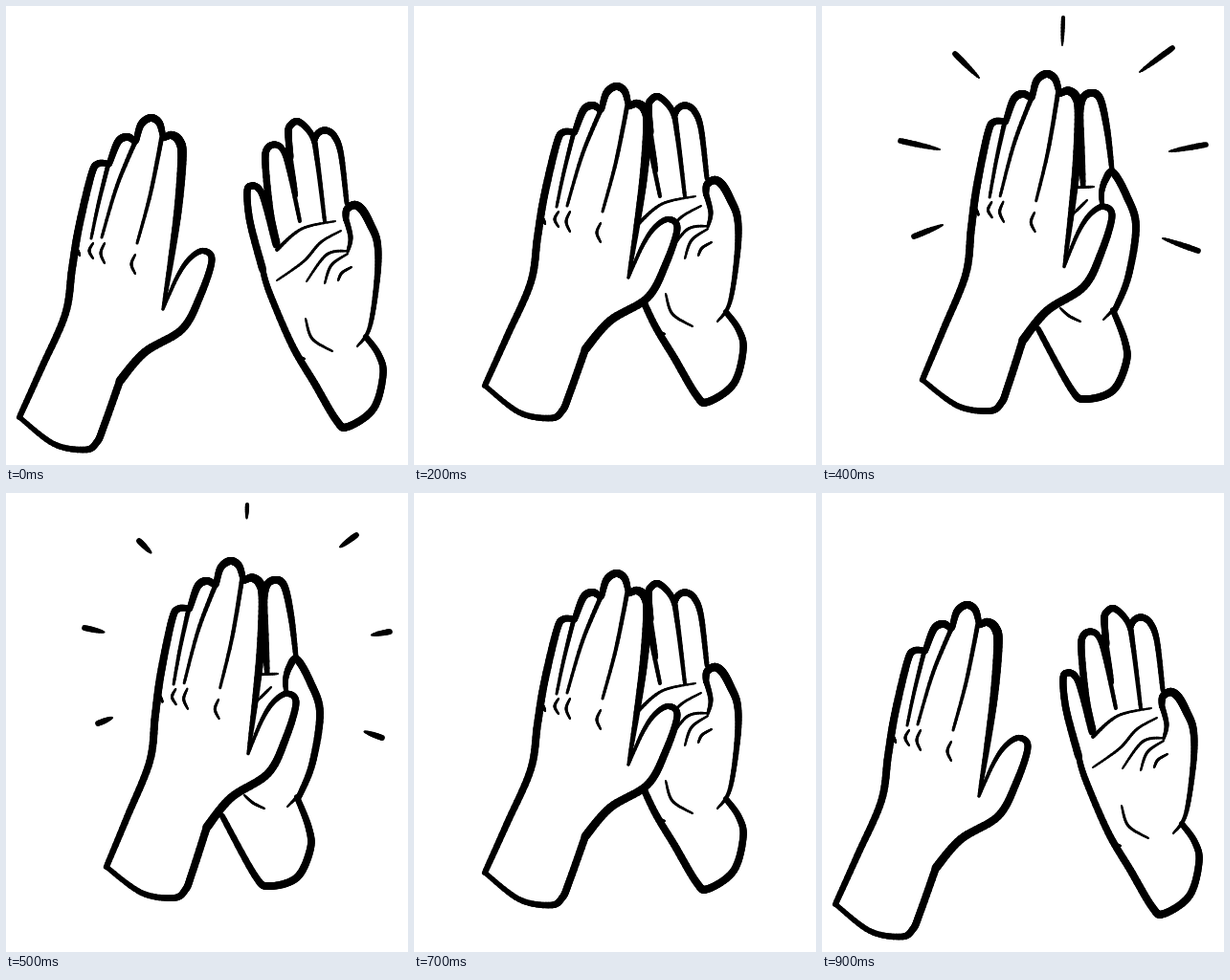
Animation, 420 px wide and 480 px high, one loop 1000 ms. Source, as an HTML page with a canvas:

```html
<!DOCTYPE html>
<html lang="en">
<head>
<meta charset="utf-8">
<title>Folding hands</title>
<style>
html, body { margin: 0; width: 100%; height: 100%; overflow: hidden; background: #fff; }
canvas { display: block; }
</style>
</head>
<body>
<canvas id="stage" width="420" height="480"></canvas>
<script>
const ctx = document.getElementById('stage').getContext('2d');

const spline = (a, b, c, d, t) =>
  b + t * (c - a + t * (2 * a - 5 * b + 4 * c - d + t * (3 * (b - c) + d - a))) / 2;

// Smooth curve through flat x, y pairs.
function smooth(xy) {
  const n = xy.length / 2, div = 10, out = [];
  const at = (i, k) => xy[2 * Math.max(0, Math.min(n - 1, i)) + k];
  for (let s = 0; s <= (n - 1) * div; s++) {
    const i = Math.min(n - 2, Math.floor(s / div)), t = s / div - i;
    out.push([0, 1].map(k => spline(at(i - 1, k), at(i, k), at(i + 1, k), at(i + 2, k), t)));
  }
  return out;
}

// A brush has a width at its start, middle and end.
const brush = (a, m, b) => (...xy) => ({ points: smooth(xy), a, m, b });
const edge = brush(6, 8, 6);
const tip = brush(6, 8, 6);
const blade = brush(6, 9.5, 3);
const finger = brush(4, 7, 7);
const gap = brush(5, 4, 3);
const crease = brush(2, 3, 2);
const knuckle = (x, y, h) => crease(x, y, x - 4, y + h / 2, x, y + h);

function ink({ points, a, m, b }) {
  const last = points.length - 1;
  for (let i = 0; i < last; i++) {
    const t = (i + 0.5) / last;
    ctx.lineWidth = a + (b - a) * t + 4 * t * (1 - t) * (m - (a + b) / 2);
    ctx.beginPath();
    ctx.moveTo(...points[i]);
    ctx.lineTo(...points[i + 1]);
    ctx.stroke();
  }
}

const backOutline = [
  edge(14, 430, 37, 379, 62, 322, 69, 275, 76, 232, 89, 177, 96, 165, 108, 165),
  tip(108, 165, 117, 142, 127, 137, 135, 142),
  tip(136, 141, 141, 124, 151, 117, 160, 122, 164, 136),
  blade(165, 138, 173, 135, 181, 141, 184, 157, 180, 210, 172, 268, 164, 317),
  brush(3, 7, 9)(164, 317, 179, 283, 192, 264, 206, 256, 215, 266, 203, 303, 184, 338, 145, 362, 119, 392),
  brush(8, 7, 5)(119, 392, 102, 440, 95, 456, 83, 464, 50, 458, 14, 430)
];
const backLines = [
  gap(107, 165, 97, 205, 89, 243),
  gap(135, 142, 116, 188, 100, 242),
  gap(163, 136, 151, 196, 137, 248),
  crease(75, 255, 77, 261),
  knuckle(91, 248, 16),
  knuckle(103, 248, 21),
  knuckle(135, 260, 20)
];

const palm = [
  brush(7, 7, 8)(282, 250, 270, 204, 264, 191, 257, 188, 252, 194, 255, 226, 268, 275),
  edge(268, 275, 275, 299, 299, 355, 322, 394, 345, 433, 357, 440, 384, 421, 394, 385, 389, 364, 376, 346),
  brush(2, 8.5, 6)(367, 356, 380, 336, 388, 283, 388, 248, 380, 227, 372, 213, 364, 208, 356, 213, 355, 223),
  brush(5, 7, 6)(356, 206, 350, 155, 343, 136, 334, 130, 326, 133, 322, 141),
  finger(333, 225, 325, 160, 320, 136, 306, 121, 297, 125, 295, 134, 297, 158),
  finger(307, 225, 296, 173, 290, 152, 282, 145, 273, 149, 271, 165, 276, 215, 283, 248),
  brush(6, 6, 4)(295, 150, 303, 198),
  brush(6, 5, 3)(355, 222, 360, 242, 357, 257),
  brush(4, 3, 2)(283, 255, 309, 233, 344, 225),
  crease(283, 287, 311, 267, 329, 247, 350, 235),
  crease(314, 288, 335, 260, 357, 256),
  crease(333, 290, 340, 271, 357, 259),
  crease(347, 287, 351, 279, 361, 273),
  crease(313, 327, 320, 348, 341, 361),
  crease(302, 366, 312, 369)
];

const turnedPalm = [
  brush(4, 8, 5)(272, 188, 269, 130, 272, 98, 282, 91, 291, 98, 298, 130, 303, 172),
  brush(4, 8, 6)(293, 211, 292, 196, 296, 182, 304, 174, 318, 198, 328, 230, 320, 283, 306, 318),
  edge(304, 318, 316, 349, 318, 372, 304, 402, 275, 411, 260, 400, 226, 338),
  brush(5, 6, 5)(270, 108, 273, 188),
  crease(262, 190, 284, 189),
  crease(263, 217, 277, 203),
  brush(5, 3, 2)(306, 316, 294, 328),
  crease(249, 316, 258, 324, 270, 330)
];

// Outer end, then inner end.
const rays = [
  [252, 12, 251, 41], [366, 44, 332, 69], [401, 145, 363, 152], [393, 256, 356, 243],
  [96, 241, 126, 229], [82, 141, 123, 150], [139, 50, 164, 75]
];

function drawRay([ox, oy, ix, iy], from, to) {
  const bulk = ox === 252 ? 4 : 5.5;
  const spot = t => [ox + (ix - ox) * t, oy + (iy - oy) * t];
  if (from === to) {
    ctx.fillStyle = '#000';
    ctx.beginPath();
    ctx.arc(ox, oy, bulk / 2, 0, 2 * Math.PI);
    ctx.fill();
  } else {
    ink(brush(bulk, bulk, 1.5)(...spot(from), ...spot(to)));
  }
}

function drawBack() {
  ctx.fillStyle = '#fff';
  ctx.beginPath();
  backOutline.forEach(s => s.points.forEach(p => ctx.lineTo(...p)));
  ctx.fill();
  backOutline.forEach(ink);
  backLines.forEach(ink);
}

function placed(x, y, draw) {
  ctx.save();
  ctx.translate(x, y);
  draw();
  ctx.restore();
}

function open(lx, ly, rx, ry) {
  placed(rx, ry, () => palm.forEach(ink));
  placed(lx, ly, drawBack);
}

function closed(from, to) {
  turnedPalm.forEach(ink);
  placed(235, 70, () => {
    ctx.rotate(-0.029);
    ctx.scale(1.01, 1.01);
    placed(-152, -116, drawBack);
  });
  rays.forEach(r => drawRay(r, from, to));
}

const apart = () => open(0, 0, 0, 0);
const near = () => open(35.5, -15, -24.5, -14.5);
const touching = () => open(60, -33, -50, -26);

// Rays grow from the inner end, then shrink to dots at the outer end.
const STEP = 100;
const steps = [
  apart, near, touching,
  () => closed(0.55, 1), () => closed(0, 1), () => closed(0, 0.5), () => closed(0, 0),
  touching, near, apart
];

const start = performance.now();
function tick() {
  const ms = performance.now() - start;
  ctx.fillStyle = '#fff';
  ctx.fillRect(0, 0, 420, 480);
  ctx.strokeStyle = '#000';
  ctx.lineCap = ctx.lineJoin = 'round';
  steps[Math.floor(ms / STEP) % steps.length]();
  requestAnimationFrame(tick);
}
tick();
</script>
</body>
</html>
```
